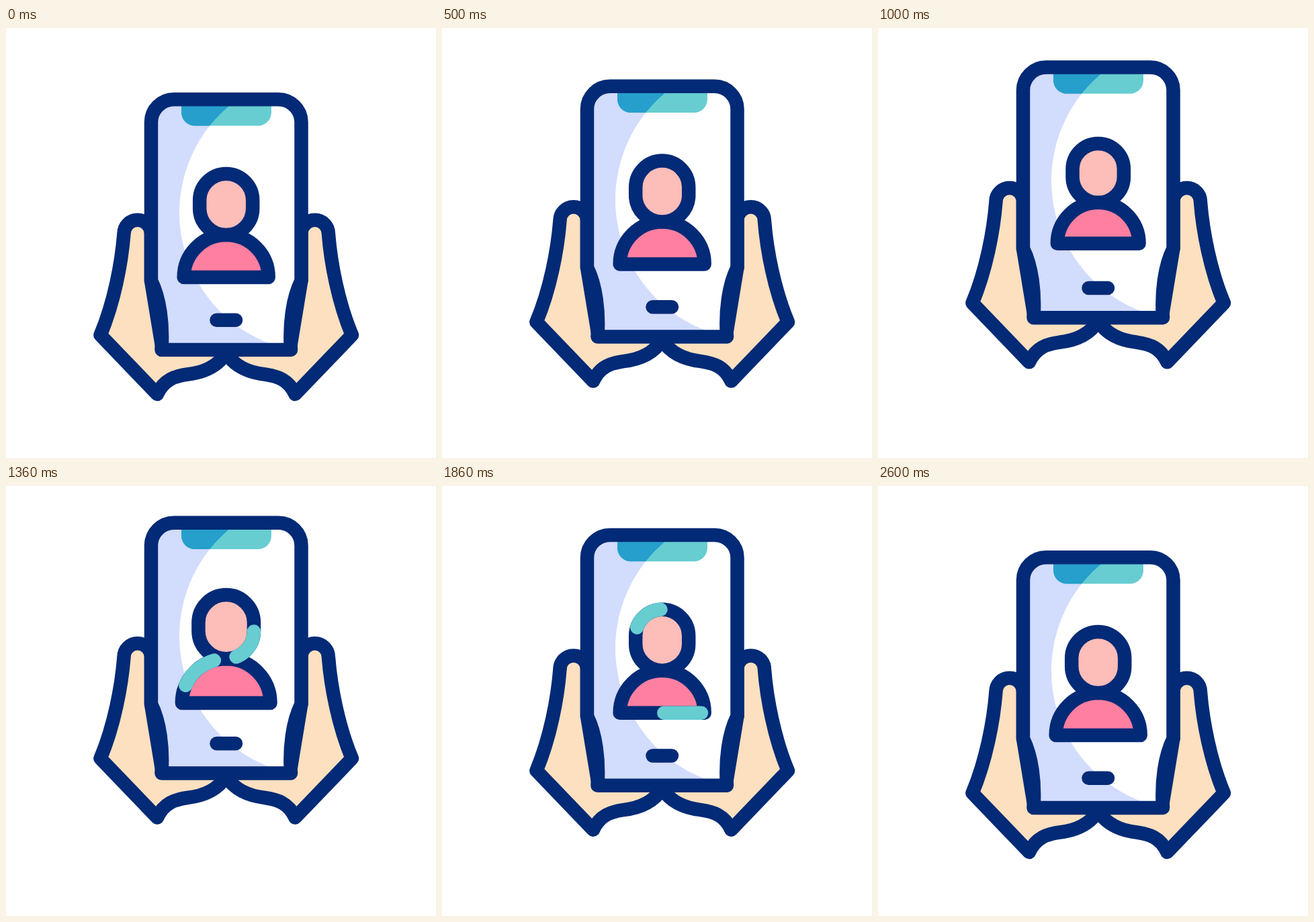
Animation, 640 px wide and 640 px high, one loop 2.62 s. Source, as an HTML page:

```html
<!DOCTYPE html>
<html lang="en">
<head>
<meta charset="utf-8">
<title>Phone in hands</title>
<style>
  html, body { margin: 0; width: 100%; height: 100%; overflow: hidden; background: #fff; }
  svg { display: block; width: 100%; height: 100%; }
  .line { stroke: #032a76; stroke-width: 20.5; stroke-linejoin: round; stroke-linecap: round; }
  #person { stroke-linejoin: round; stroke-linecap: round; }
  #person .ink { stroke: #032a76; }
  #person .glow { fill: none; stroke: #67cdd1; }
</style>
</head>
<body>
<svg viewBox="0 0 640 640">
  <defs>
    <path id="case" d="M231.5 479C234 440 229 402 216 376V140A34 34 0 0 1 250 106.3H405.5A34 34 0 0 1 439.5 140V376C426.500 402 421.500 440 424 479Z"/>
    <path id="notch" d="M261 106H395V125.500A20 20 0 0 1 375 145.500H281A20 20 0 0 1 261 125.500Z"/>
    <path id="hand" class="line" fill="#fce0bf" d="M216 306A20.200 20.200 0 0 0 175.500 306C172 350 161 408 140.500 457L225 545C235 523 252 518 270 515.500C292 513 314 505 327.700 484V470H231.500L216 376Z"/>
    <path id="head" pathLength="1" d="M327.700 308a39.500 39.500 0 0 0 39.500-39.500v-12a39.500 39.500 0 0 0-79 0v12a39.500 39.500 0 0 0 39.500 39.500Z"/>
    <path id="body" pathLength="1" d="M327.700 308A63 63 0 0 0 264.700 371H390.700A63 63 0 0 0 327.700 308Z"/>
    <clipPath id="inCase"><use href="#case"/></clipPath>
    <clipPath id="inNotch"><use href="#notch"/></clipPath>
    <path id="shade" fill-rule="evenodd" d="M200 90H466V490H200ZM258 275a208 208 0 0 0 416 0a208 208 0 0 0-416 0Z"/>
  </defs>
  <g id="scene">
    <use href="#hand"/>
    <use href="#hand" transform="translate(655.4) scale(-1 1)"/>
    <use href="#case" fill="#fff"/>
    <g clip-path="url(#inCase)">
      <use href="#shade" fill="#d2dcfd"/>
      <use href="#notch" fill="#67cdd1"/>
      <g clip-path="url(#inNotch)"><use href="#shade" fill="#269fcc"/></g>
    </g>
    <use href="#case" class="line" fill="none"/>
    <path class="line" d="M313.500 434.700H342"/>
    <path id="ripple" fill="#67cdd1" fill-rule="evenodd" transform="translate(327.200 434.700)"/>
    <g id="person">
      <use href="#body" class="ink" fill="#ff7fa1"/>
      <use href="#head" class="ink" fill="#fdbdb9"/>
      <g id="glow">
        <use href="#body" class="glow"/>
        <use href="#head" class="glow"/>
      </g>
    </g>
  </g>
</svg>
<script>
const LOOP = 2620;
const [scene, person, glow, ripple] =
  ['scene', 'person', 'glow', 'ripple'].map(id => document.getElementById(id));

const part = (t, from, to) => Math.min(1, Math.max(0, (t - from) / (to - from)));
const ease = (t, from, to) => {
  const p = part(t, from, to);
  return p * p * (3 - 2 * p);
};

// Eased value through [time, value] keys
function keyed(t, keys) {
  let value = keys[0][1];
  for (let i = 1; i < keys.length; i++)
    value += (keys[i][1] - keys[i - 1][1]) * ease(t, keys[i - 1][0], keys[i][0]);
  return value;
}

const disc = r => `M${-r} 0a${r} ${r} 0 0 0 ${2 * r} 0a${r} ${r} 0 0 0 ${-2 * r} 0Z`;
const square = r => `M${-r} ${-r}H${r}V${r}H${-r}Z`;

function draw(t) {
  const lift = keyed(t, [[0, 0], [1200, -51.5], [1360, -51.5], [2610, 0]]);
  scene.setAttribute('transform', `translate(0 ${lift})`);

  // The outline keeps its width while the figure pulses
  const size = keyed(t, [[600, 1], [800, 0.92], [1300, 1.05], [1600, 1]]);
  person.setAttribute('transform', `translate(327.7 294) scale(${size}) translate(-327.7 -294)`);
  person.setAttribute('stroke-width', 20.5 / size);

  const tail = part(t, 1302, 2402), tip = part(t, 1113, 2213);
  glow.setAttribute('visibility', tip > tail ? 'visible' : 'hidden');
  glow.setAttribute('stroke-dasharray', `${Math.max(0, tip - tail)} 2`);
  glow.setAttribute('stroke-dashoffset', -tail);

  const p = part(t, 620, 940), r = 42 * p;
  const hole = Math.max(0, r - 6.5), edge = r + 6.5;
  ripple.setAttribute('d', (r < 14 ? square : disc)(edge) + (hole ? disc(hole) : ''));
  ripple.setAttribute('opacity', p > 0 ? 0.83 * (1 - p) : 0);
}

function tick() {
  draw(performance.now() % LOOP);
  requestAnimationFrame(tick);
}
tick();
</script>
</body>
</html>
```
